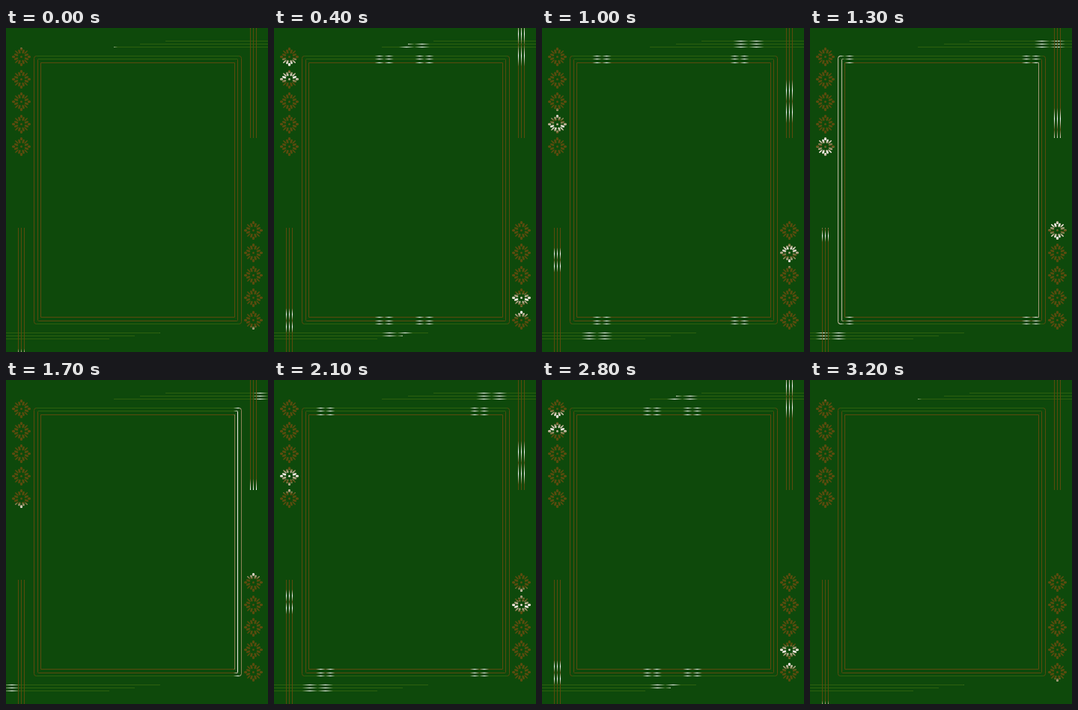
Animation, 350 px wide and 433 px high, one loop 3.3 s. Source, as an HTML page with a canvas:

```html
<!DOCTYPE html>
<html lang="en">
<head>
<meta charset="utf-8">
<title>Ornamental frame</title>
<style>
html, body { margin: 0; height: 100%; overflow: hidden; background: #0e490b; }
canvas { display: block; }
</style>
</head>
<body>
<canvas id="stage" width="350" height="433"></canvas>
<script>
const ctx = document.getElementById('stage').getContext('2d');
const BROWN = '#5b4b0e', OLIVE = '#2d600e';
const STEP = 100, STEPS = 33;

function linePath(...lines) {
  const path = new Path2D();
  for (const [x1, y1, x2, y2] of lines) {
    path.moveTo(x1, y1);
    path.lineTo(x2, y2);
  }
  return path;
}

// Column of five flowers with four axial tips and four diagonal stamens.
function flowerColumn(x, top) {
  const path = new Path2D();
  const petal = (y, angle, r, long, wide) => {
    const px = x + r * Math.cos(angle), py = y + r * Math.sin(angle);
    path.moveTo(px + long * Math.cos(angle), py + long * Math.sin(angle));
    path.ellipse(px, py, long, wide, angle, 0, 2 * Math.PI);
    path.closePath();
  };
  for (let i = 0; i < 5; i++) {
    const y = top + 30 * i;
    petal(y, 0, 0, 1.5, 1.5);
    for (let q = 0; q < 4; q++) {
      const a = q * Math.PI / 2;
      petal(y, a, 10.4, 2.2, 1.7);
      petal(y, a - 0.36, 7.4, 2.9, 1.4);
      petal(y, a + 0.36, 7.4, 2.9, 1.4);
      petal(y, a + Math.PI / 4, 8.6, 3.2, 0.9);
    }
  }
  return path;
}

const border = new Path2D();
border.roundRect(37.5, 37.5, 277, 358, 3);
border.roundRect(42.5, 41.5, 267, 350, 1);
border.rect(46.5, 46.5, 259, 340);

// mid, speed and gap place a pair of glints along the axis at each step.
const parts = [
  { path: linePath([213, 17.5, 350, 17.5], [179, 21.5, 350, 21.5], [144, 25.5, 350, 25.5]),
    color: OLIVE, axis: 'x', mid: 128.5, speed: 14.75, gap: 20.8 },
  { path: linePath([0, 407.5, 206, 407.5], [0, 411.5, 172, 411.5], [0, 415.5, 138, 415.5]),
    color: OLIVE, axis: 'x', mid: 225.5, speed: -15.2, gap: 20.8 },
  { path: linePath([326.5, 0, 326.5, 147], [330.5, 0, 330.5, 147], [334.5, 0, 334.5, 147]),
    color: BROWN, axis: 'y', mid: -28, speed: 12.6, gap: 29 },
  { path: linePath([16.5, 267, 16.5, 433], [20.5, 267, 20.5, 433], [24.5, 267, 24.5, 433]),
    color: BROWN, axis: 'y', mid: 445, speed: -13.5, gap: 16.5 },
  { path: flowerColumn(20.5, 38.5), fill: true,
    color: BROWN, axis: 'y', mid: 11.5, speed: 11.25, gap: 17 },
  { path: flowerColumn(330.5, 270.5), fill: true,
    color: BROWN, axis: 'y', mid: 415, speed: -11.05, gap: 17 },
  { path: border, clip: [0, 176],
    color: BROWN, axis: 'x', mid: 192, speed: -11.2, gap: 12.8 },
  { path: border, clip: [176, 174],
    color: BROWN, axis: 'x', mid: 159, speed: 10.5, gap: 12.8 }
];

function glints({ axis, mid, speed, gap }, step) {
  const c = mid + speed * step, a = c - gap, b = c + gap;
  const g = axis === 'x'
    ? ctx.createLinearGradient(a, 0, b, 0)
    : ctx.createLinearGradient(0, a, 0, b);
  for (let i = 0; i < 5; i++) g.addColorStop(i / 4, `rgba(255,255,255,${i % 2})`);
  return g;
}

function paint(part, style) {
  if (part.fill) {
    ctx.fillStyle = style;
    ctx.fill(part.path);
  } else {
    ctx.strokeStyle = style;
    ctx.stroke(part.path);
  }
}

function draw(step) {
  ctx.fillStyle = '#0e490b';
  ctx.fillRect(0, 0, 350, 433);
  for (const part of parts) {
    ctx.save();
    if (part.clip) {
      ctx.beginPath();
      ctx.rect(part.clip[0], 0, part.clip[1], 433);
      ctx.clip();
    }
    paint(part, part.color);
    if (part.path === border) {
      // The outer horizontals are greener than the rest of the border.
      paint({ path: linePath([41, 37.5, 311, 37.5], [43, 41.5, 309, 41.5], [41, 395.5, 311, 395.5]) }, OLIVE);
    }
    paint(part, glints(part, step));
    ctx.restore();
  }
}

const start = performance.now();
function tick() {
  const k = Math.floor((performance.now() - start) / STEP) % STEPS;
  draw(16 - Math.abs(16 - k));
  requestAnimationFrame(tick);
}
tick();
</script>
</body>
</html>
```
